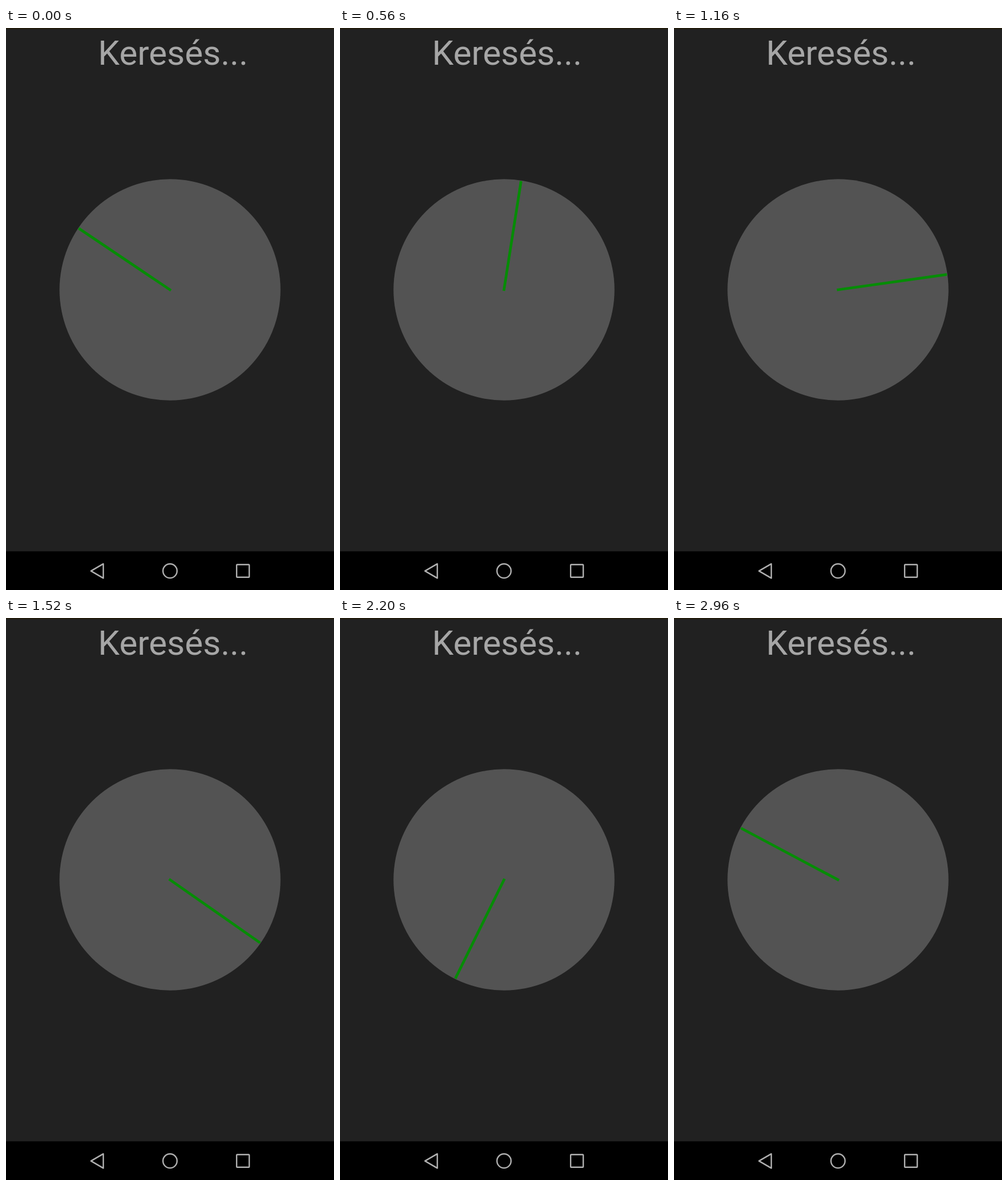
Recreate the animation shown at these times as an HTML page. Size 572 px wide and 979 px high, loop 3000 ms.

```html
<!DOCTYPE html>
<html lang="hu">
<head>
<meta charset="utf-8">
<style>
  html, body { margin: 0; width: 100%; height: 100%; overflow: hidden; background: #212121; }
  svg { display: block; width: 572px; height: 979px; }
  text { font: 60px Roboto, sans-serif; fill: #a6a6a6; }
  .nav { fill: none; stroke: #b0b0b0; stroke-width: 2.4; stroke-linejoin: round; }
</style>
</head>
<body>
<svg viewBox="0 0 572 979">
  <rect width="572" height="979" fill="#212121"/>
  <rect width="572" height="2" fill="#211b0c"/>
  <text x="160.5" y="64.2">Keresés...</text>
  <circle cx="286" cy="456" r="192.7" fill="#535353"/>
  <path id="hand" d="M0 2V-191.8" stroke="#068c06" stroke-width="4.7"/>
  <rect y="911.6" width="572" height="68" fill="#000"/>
  <g class="nav">
    <path d="M148.2 945.9L169.7 933.4V958.4Z"/>
    <circle cx="286" cy="945.8" r="12.3"/>
    <rect x="402.2" y="934.7" width="22" height="22" rx="1"/>
  </g>
</svg>
<script>
  const LOOP = 3000, STEP = 40;
  // The sweep is nearly uniform: [time in ms, degrees clockwise from the top]
  const keys = [[0, -56.1], [320, -19.5], [840, 42.1], [1160, 82],
                [1880, 167.9], [2480, 239.8], [2960, 298]];
  const hand = document.getElementById('hand');

  function angleAt(t) {
    const i = Math.max(1, keys.findIndex(([time]) => time >= t));
    const [t0, a0] = keys[i - 1], [t1, a1] = keys[i];
    return a0 + (a1 - a0) * (t - t0) / (t1 - t0);
  }

  function draw() {
    const t = Math.floor(performance.now() % LOOP / STEP) * STEP;
    hand.setAttribute('transform', `translate(286 456) rotate(${angleAt(t)})`);
    requestAnimationFrame(draw);
  }
  draw();
</script>
</body>
</html>
```
